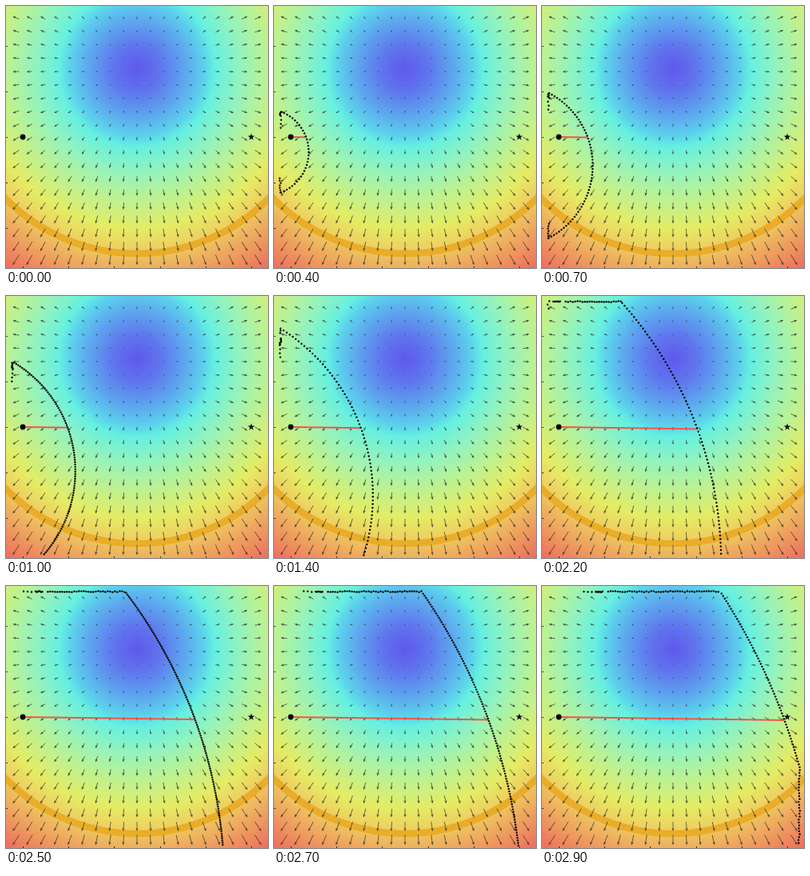
These frames come from a looping animation (328 by 328 pixels, 3000 ms). An HTML page with a canvas:

```html
<!DOCTYPE html>
<html lang="en">
<head>
<meta charset="utf-8">
<title>Front propagation in a radial flow</title>
<style>
  html, body { margin: 0; width: 100%; height: 100%; overflow: hidden; }
  canvas { display: block; width: 328px; height: 328px; }
</style>
</head>
<body>
<canvas id="stage" width="328" height="328"></canvas>
<script>
const SIZE = 328, STEP = 100, STEPS = 30;
const START = { x: 21, y: 164 }, GOAL = { x: 307, y: 164 };
const CENTER = { x: 164, y: 79 };
const WALL = { left: 8, top: 7, right: 322, bottom: 325 };

// The flow grows linearly away from CENTER; the front adds its own speed.
const GROWTH = 0.05, SPEED = 12.22;

const ctx = document.getElementById('stage').getContext('2d');
const noise = n => {
  const v = Math.sin(n * 127.1 + 11.7) * 43758.5453;
  return v - Math.floor(v);
};

// In a linear flow every front is a circle that drifts and widens.
function frontAt(k) {
  const e = Math.exp(GROWTH * k);
  return {
    x: CENTER.x + (START.x - CENTER.x) * e,
    y: CENTER.y + (START.y - CENTER.y) * e,
    r: SPEED * (e - 1) / GROWTH
  };
}

// Wall positions run up the left side (negative) and along the top (positive).
const wallPoint = s => s < 0
  ? { x: WALL.left, y: WALL.top - s }
  : { x: WALL.left + s, y: WALL.top };

function wallGap(u) {
  if (u < 15) return 5;
  if (u < 23) return 1.4;
  return u < 30 ? 7 : 3;
}

function disc(x, y, r) {
  ctx.beginPath();
  ctx.arc(x, y, r, 0, Math.PI * 2);
  ctx.fill();
}

const dot = (x, y) => disc(x, y, 1.2);

function drawArc(front) {
  let turn = 0.075;
  while (front.r * turn > 5.2) turn /= 2;
  for (let a = -Math.PI / 2, n = 0; a < Math.PI / 2; a += turn, n++) {
    const x = front.x + front.r * Math.cos(a), y = front.y + front.r * Math.sin(a);
    if (x < WALL.left || y < WALL.top || y > WALL.bottom) continue;
    dot(x > WALL.right ? WALL.right + noise(n) * 2 - 1 : x, y);
  }
}

function drawWallDots(front, k) {
  const wobble = n => noise(n + k * 3) * 2 - 1;
  const reached = p => Math.hypot(p.x - front.x, p.y - front.y) < front.r;
  const first = 7.6 * k - 176;
  for (let s = first, n = 0; reached(wallPoint(s)); s += wallGap(s - first), n++) {
    const p = wallPoint(s);
    if (s < 0) dot(p.x + wobble(n), p.y);
    else dot(p.x, p.y + wobble(n) * 0.7);
  }
  const low = front.y + Math.sqrt(front.r ** 2 - (WALL.left - front.x) ** 2);
  if (low < WALL.bottom) {
    for (let n = 0; n < 7; n++) dot(WALL.left + wobble(n + 50), low - n * 3);
  }
}

// Straight track from the start to the front, tilted slightly downwards
function drawTrack(front) {
  const tilt = Math.atan2(4, 284), dx = Math.cos(tilt), dy = Math.sin(tilt);
  const px = START.x - front.x, py = START.y - front.y, b = px * dx + py * dy;
  const len = Math.sqrt(b * b - px * px - py * py + front.r ** 2) - b;
  ctx.strokeStyle = '#f2544a';
  ctx.lineWidth = 2;
  ctx.beginPath();
  ctx.moveTo(START.x, START.y);
  ctx.lineTo(START.x + dx * len, START.y + dy * len);
  ctx.stroke();
}

function drawArrow(x, y) {
  const dx = x - CENTER.x, dy = y - CENTER.y;
  const len = Math.hypot(dx, dy) * 0.055, head = Math.min(4, len * 0.55), w = head * 0.4;
  ctx.save();
  ctx.translate(x, y);
  ctx.rotate(Math.atan2(dy, dx));
  ctx.beginPath();
  ctx.moveTo(0, 0);
  ctx.lineTo(len - head * 0.7, 0);
  ctx.stroke();
  ctx.beginPath();
  ctx.moveTo(len, 0);
  ctx.lineTo(len - head, w);
  ctx.lineTo(len - head * 0.8, 0);
  ctx.lineTo(len - head, -w);
  ctx.fill();
  ctx.restore();
}

function drawField() {
  const { x, y } = CENTER, reach = 300;
  const shade = ctx.createRadialGradient(x, y, 0, x, y, reach);
  [[0, '#6058ec'], [30, '#5f76ee'], [60, '#5da6ee'], [85, '#5cd3ec'], [98, '#66f0e0'],
   [130, '#93f3bd'], [160, '#b8f296'], [200, '#e4ec64'], [225, '#eed060'],
   [260, '#eea05e'], [reach, '#ee6a60']].forEach(([r, c]) => shade.addColorStop(r / reach, c));
  ctx.fillStyle = shade;
  ctx.fillRect(0, 0, SIZE, SIZE);

  ctx.strokeStyle = '#e9ad29';
  ctx.lineWidth = 8.6;
  ctx.beginPath();
  ctx.arc(x, y, 231, 0, Math.PI * 2);
  ctx.stroke();

  ctx.strokeStyle = ctx.fillStyle = 'rgba(40, 45, 35, 0.8)';
  ctx.lineWidth = 0.8;
  const gap = SIZE / 20;
  for (let i = 1; i < 20; i++) {
    for (let j = 1; j < 20; j++) drawArrow(i * gap, j * gap);
  }

  ctx.fillStyle = 'rgba(0, 0, 0, 0.75)';
  for (let i = 0; i < 6; i++) {
    ctx.fillRect(Math.round(21 + i * 57.2), SIZE - 2, 1, 2);
    if (i < 5) ctx.fillRect(0, 50 + i * 57, 2, 1);
  }
}

function drawStar(x, y, r) {
  ctx.beginPath();
  for (let i = 0; i < 10; i++) {
    const a = i * Math.PI / 5 - Math.PI / 2, q = i % 2 ? r * 0.4 : r;
    ctx.lineTo(x + q * Math.cos(a), y + q * Math.sin(a));
  }
  ctx.fill();
}

function draw(k) {
  drawField();
  ctx.fillStyle = '#000';
  if (k > 0) {
    const front = frontAt(k);
    drawTrack(front);
    drawArc(front);
    drawWallDots(front, k);
  }
  disc(START.x, START.y, 3.4);
  drawStar(GOAL.x, GOAL.y, 4.5);
}

let shown = -1;
function tick() {
  const k = Math.floor(performance.now() / STEP) % STEPS;
  if (k !== shown) draw(shown = k);
  requestAnimationFrame(tick);
}
tick();
</script>
</body>
</html>
```
